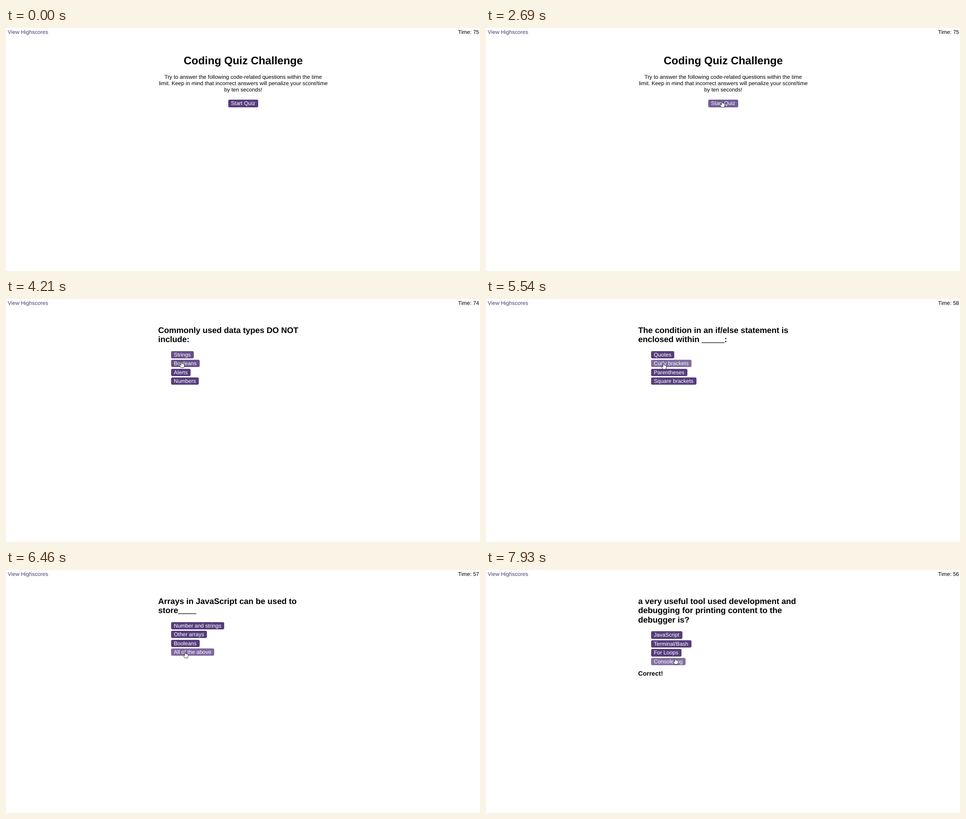
Animation of 1045x536 px, one loop 8 s. Source, as an HTML page:

```html
<!DOCTYPE html>
<html lang="en">
<head>
<meta charset="utf-8">
<title>Coding Quiz Challenge</title>
<style>
  html, body { margin: 0; width: 100%; height: 100%; overflow: hidden; background: #fff; }
  body {
    position: relative; color: #000;
    font: 12px/13.8px "Liberation Sans", Arial, sans-serif;
    text-rendering: geometricPrecision;
  }
  .scores, .time { position: absolute; top: 2px; line-height: 14px; white-space: nowrap; }
  .scores { left: 3.75px; color: #454075; }
  .time { right: 2px; }
  .scene { position: absolute; left: 335.5px; top: 58.5px; width: 375px; visibility: hidden; white-space: nowrap; }
  .intro { text-align: center; }
  h1, h2, p { margin: 0; }
  h1 { font-size: 24px; line-height: 27.6px; }
  h2 { font-size: 18px; line-height: 20.7px; margin-bottom: 14.7px; }
  p { margin: 15.9px 0 15.1px; }
  .blank { text-shadow: 0 -1px; }
  .option { display: table; height: 16.4px; margin: 0 0 3.05px 28.3px; padding: 0 6.7px 0 6.2px;
    border-radius: 3px; color: #fff; background: #563d7c; line-height: 16.4px; }
  .intro .option { margin: 0 auto; }
  .verdict { margin-top: 10.1px; font-size: 14.04px; font-weight: bold; line-height: 16px; }
  svg { position: absolute; left: 0; top: 0; width: 18px; height: 18px; overflow: visible; }
  svg path { fill: #fff; stroke: #111; stroke-width: 1.3; stroke-linejoin: round; }
</style>
</head>
<body>
<div class="scores">View Highscores</div>
<div class="time">Time: 75</div>
<div class="scene intro">
  <h1>Coding Quiz Challenge</h1>
  <p>Try to answer the following code-related questions within the time<br>limit. Keep in mind that incorrect answers will penalize your score/time<br>by ten seconds!</p>
  <div class="option">Start Quiz</div>
</div>
<svg id="cursor">
  <g transform="scale(.65)">
    <path id="arrow" d="M.5.5V16.5L4.2 13 6.7 18.5 9 17.5 6.7 12H11.5Z"/>
    <path id="hand" d="M-1.5 12V2Q-1.5.5 0 .5T1.5 2V7Q4 6 4.5 8 7 7 7.5 9 10 8.5 10 11V15Q10 18 8 21.5H-1.5L-6 14.5Q-7 12-5 11.5-3.5 11.5-1.5 14Z"/>
  </g>
</svg>
<script>
const LOOP = 8000, FADE = 150;
const QUIZ_START = 3060, PAUSE = 300, TIME_LIMIT = 75, PENALTY = 15;

const questions = [
  { title: "Commonly used data types DO NOT<br>include:",
    options: ["Strings", "Booleans", "Alerts", "Numbers"], answered: 5110, verdict: "Wrong!" },
  { title: "The condition in an if/else statement is<br>enclosed within <span class='blank'>_____</span>:",
    options: ["Quotes", "Curly brackets", "Parentheses", "Square brackets"], answered: 5830, verdict: "Correct!" },
  { title: "Arrays in JavaScript can be used to<br>store<span class='blank'>____</span>",
    options: ["Number and strings", "Other arrays", "Booleans", "All of the above"], answered: 6920, verdict: "Correct!" },
  { title: "a very useful tool used development and<br>debugging for printing content to the<br>debugger is?",
    options: ["JavaScript", "Terminal/Bash", "For Loops", "Console.log"], answered: 7780, verdict: "Correct!" }
];

// Each move eases the pointer to a new resting place.
const entry = { x: 796, y: 532 };
const moves = [
  { from: 380, to: 710, x: 815, y: 489 },
  { from: 970, to: 1240, x: 812, y: 456 },
  { from: 1640, to: 2300, x: 521, y: 138 },
  { from: 2450, to: 2630, x: 520, y: 161 },
  { from: 3100, to: 3550, x: 470, y: 189 },
  { from: 3550, to: 4000, x: 402, y: 126 },
  { from: 4000, to: 4240, x: 386, y: 138 },
  { from: 4300, to: 4480, x: 385, y: 130 },
  { from: 5110, to: 5270, x: 391, y: 141 },
  { from: 5680, to: 5780, x: 392, y: 160 },
  { from: 5850, to: 6150, x: 437, y: 219 },
  { from: 6210, to: 6400, x: 395, y: 180 },
  { from: 6950, to: 7130, x: 417, y: 194 }
];

const $ = selector => document.querySelector(selector);
const time = $(".time"), cursor = $("#cursor"), arrow = $("#arrow"), hand = $("#hand");

for (const q of questions) {
  const scene = document.createElement("div");
  scene.className = "scene";
  scene.innerHTML = `<h2>${q.title}</h2>` +
    q.options.map(text => `<div class="option">${text}</div>`).join("") +
    `<div class="verdict">${q.verdict}</div>`;
  cursor.before(scene);
}

const starts = [0, QUIZ_START, ...questions.map(q => q.answered + PAUSE)];
const scenes = [...document.querySelectorAll(".scene")].map((el, i) => ({
  el,
  start: starts[i],
  answered: i ? questions[i - 1].answered : LOOP,
  verdict: el.querySelector(".verdict"),
  options: [...el.querySelectorAll(".option")].map(node => ({ node, box: node.getBoundingClientRect() }))
}));

const clamp = v => Math.min(1, Math.max(0, v));
const ease = k => k * k * (3 - 2 * k);
const inside = (p, b) => p && p.x >= b.left && p.x <= b.right && p.y >= b.top && p.y <= b.bottom;

function pointer(t) {
  if (t < moves[0].from) return null;
  return moves.reduce((p, m) => {
    const k = ease(clamp((t - m.from) / (m.to - m.from)));
    return { x: p.x + (m.x - p.x) * k, y: p.y + (m.y - p.y) * k };
  }, entry);
}

function secondsLeft(t) {
  const elapsed = Math.max(0, Math.floor((t - QUIZ_START) / 1000));
  const mistakes = questions.filter(q => q.verdict === "Wrong!" && q.answered <= t).length;
  return TIME_LIMIT - elapsed - mistakes * PENALTY;
}

// Replays the recent pointer path, so the fade depends on the time alone.
function glow(box, start, t) {
  const step = 10;
  let level = 0;
  for (let s = Math.max(start, t - 500); s < t; s += step) {
    level = clamp(level + (inside(pointer(s), box) ? step : -step) / FADE);
  }
  return level;
}

function render(t) {
  const scene = scenes.filter(s => s.start <= t).pop();
  for (const s of scenes) {
    s.el.style.visibility = s === scene ? "visible" : "hidden";
    if (s.verdict) s.verdict.style.visibility = t >= s.answered ? "inherit" : "hidden";
  }
  time.textContent = "Time: " + secondsLeft(t);

  for (const { node, box } of scene.options) {
    node.style.background = `color-mix(in srgb, #8570a6 ${glow(box, scene.start, t) * 100}%, #563d7c)`;
  }

  const tip = pointer(t);
  cursor.style.display = tip ? "block" : "none";
  if (!tip) return;
  const over = scene.options.some(o => inside(tip, o.box));
  hand.style.display = over ? "inline" : "none";
  arrow.style.display = over ? "none" : "inline";
  cursor.style.transform = `translate(${tip.x}px, ${tip.y}px)`;
}

const origin = performance.now();
function frame() {
  render((performance.now() - origin) % LOOP);
  requestAnimationFrame(frame);
}
frame();
</script>
</body>
</html>
```
